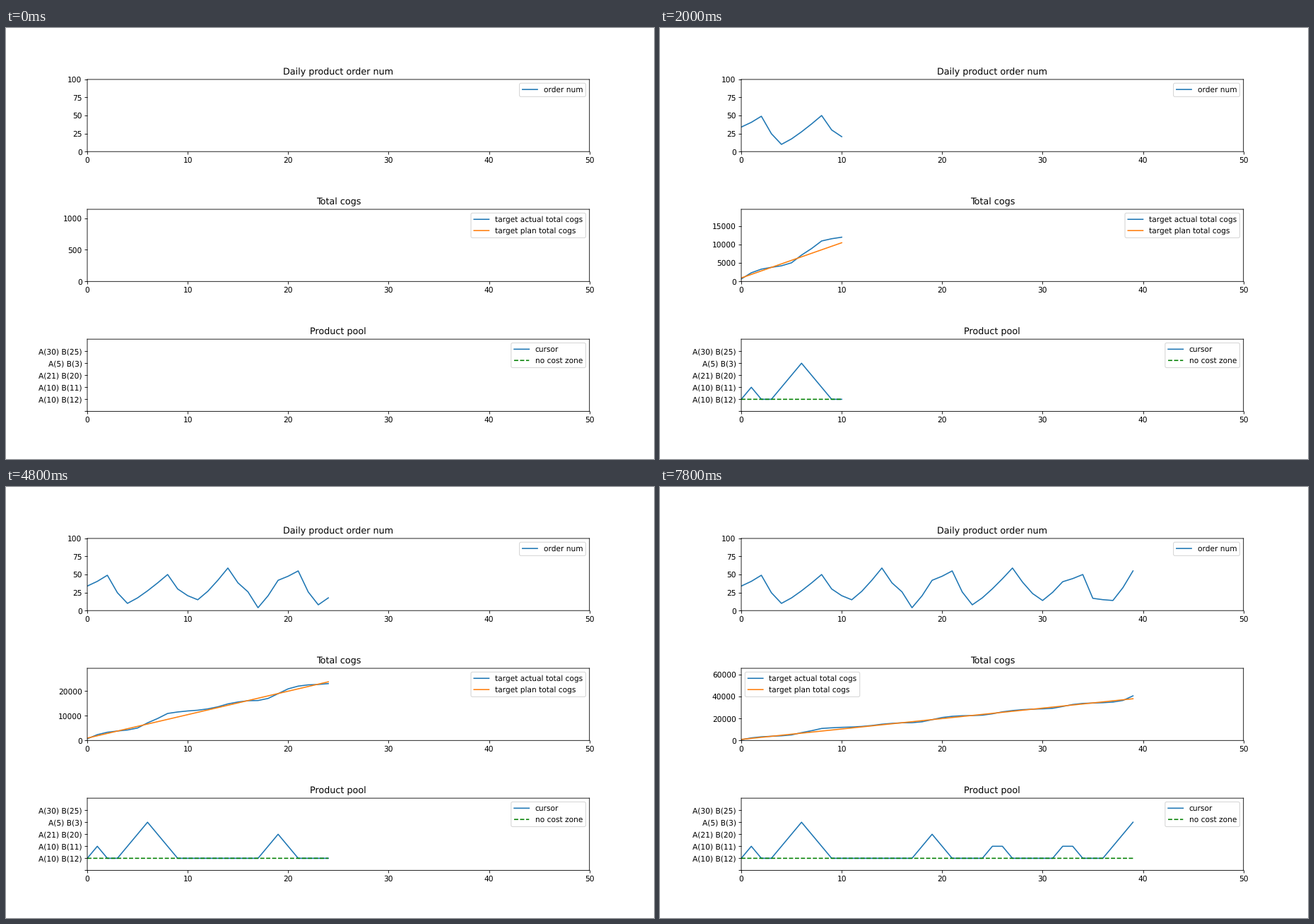
Animation of 917 by 611 pixels, one loop 8 s. Source, as a matplotlib script:

```python
from itertools import pairwise

import numpy as np
import matplotlib.pyplot as plt
from matplotlib.animation import FuncAnimation

# Soft, unhinted edges, as if shrunk from a 1200 x 800 canvas.
plt.rcParams.update({"path.snap": False, "text.hinting": "none"})

WIDTH, HEIGHT, DPI = 917, 611, 917 / 12
DX, DY = 0.5 / 1200, 0.5 / 800
FRAMES, INTERVAL = 40, 200
PLAN_STEP = 950
DAYS = np.arange(FRAMES)

POOL = [(10, 12), (10, 11), (21, 20), (5, 3), (30, 25)]

# (day, orders) where demand turns or bends
TURNS = [(0, 34), (2, 49), (4, 10), (8, 50), (9, 30), (11, 15), (14, 59),
         (16, 26), (17, 4), (19, 42), (21, 55), (23, 8), (27, 59), (30, 14),
         (32, 40), (34, 50), (35, 17), (37, 14), (39, 55)]

# (day, height) of each climb of the cursor above its resting level
CLIMBS = [(1, 1), (6, 3), (19, 2), (25.5, 1.5), (32.5, 1.5), (39, 3)]


def daily_orders():
    """Rises gather speed, falls start steep and level off."""
    values = [TURNS[0][1]]
    for (d0, v0), (d1, v1) in pairwise(TURNS):
        u = np.arange(1, d1 - d0 + 1) / (d1 - d0)
        ease = u ** 1.2 if v1 > v0 else 1 - (1 - u) ** 1.4
        values.extend(v0 + (v1 - v0) * ease)
    return np.array(values)


def cost_limits(totals):
    """Upper y limit per day, growing by half once the total gets near it."""
    top, tops = 1.2 * PLAN_STEP, []
    for total in totals:
        if total > 0.8 * top:
            top *= 1.5
        tops.append(top)
    return tops


orders = daily_orders()
cursor = 1 + sum(np.maximum(0, h - abs(DAYS - d)) for d, h in CLIMBS).astype(int)
unit_cost = np.cumsum([a for a, _ in POOL])
actual = np.cumsum(orders * unit_cost[cursor])
plan = PLAN_STEP * (DAYS + 1)
tops = cost_limits(actual)

fig, (ax_orders, ax_cost, ax_pool) = plt.subplots(
    3, 1, figsize=((WIDTH + 0.01) / DPI, (HEIGHT + 0.01) / DPI), dpi=DPI)
fig.subplots_adjust(left=0.125 + DX, right=0.9 + DX,
                    bottom=0.11 + DY, top=0.88 + DY, hspace=0.8)


def setup(ax, title, top, series):
    """Style one panel and return (line, data) pairs."""
    ax.set_title(title)
    ax.set_xlim(0, 50)
    ax.set_ylim(0, top)
    pairs = [(ax.plot([], [], style, label=label)[0], data)
             for label, style, data in series]
    ax.legend(loc="best")
    return pairs


curves = setup(ax_orders, "Daily product order num", 100,
               [("order num", "C0-", orders)])
curves += setup(ax_cost, "Total cogs", tops[0],
                [("target actual total cogs", "C0-", actual),
                 ("target plan total cogs", "C1-", plan)])
curves += setup(ax_pool, "Product pool", len(POOL) + 1,
                [("cursor", "C0-", cursor),
                 ("no cost zone", "g--", np.ones(FRAMES))])
ax_pool.set_yticks(range(len(POOL) + 1),
                   [""] + [f"A({a}) B({b})" for a, b in POOL])


def update(day):
    for line, data in curves:
        line.set_data(DAYS[:day + 1], data[:day + 1])
    ax_cost.set_ylim(0, tops[day])
    return [line for line, _ in curves]


anim = FuncAnimation(fig, update, frames=FRAMES, interval=INTERVAL,
                     init_func=lambda: update(0), repeat=True, repeat_delay=0)
plt.show()
```
